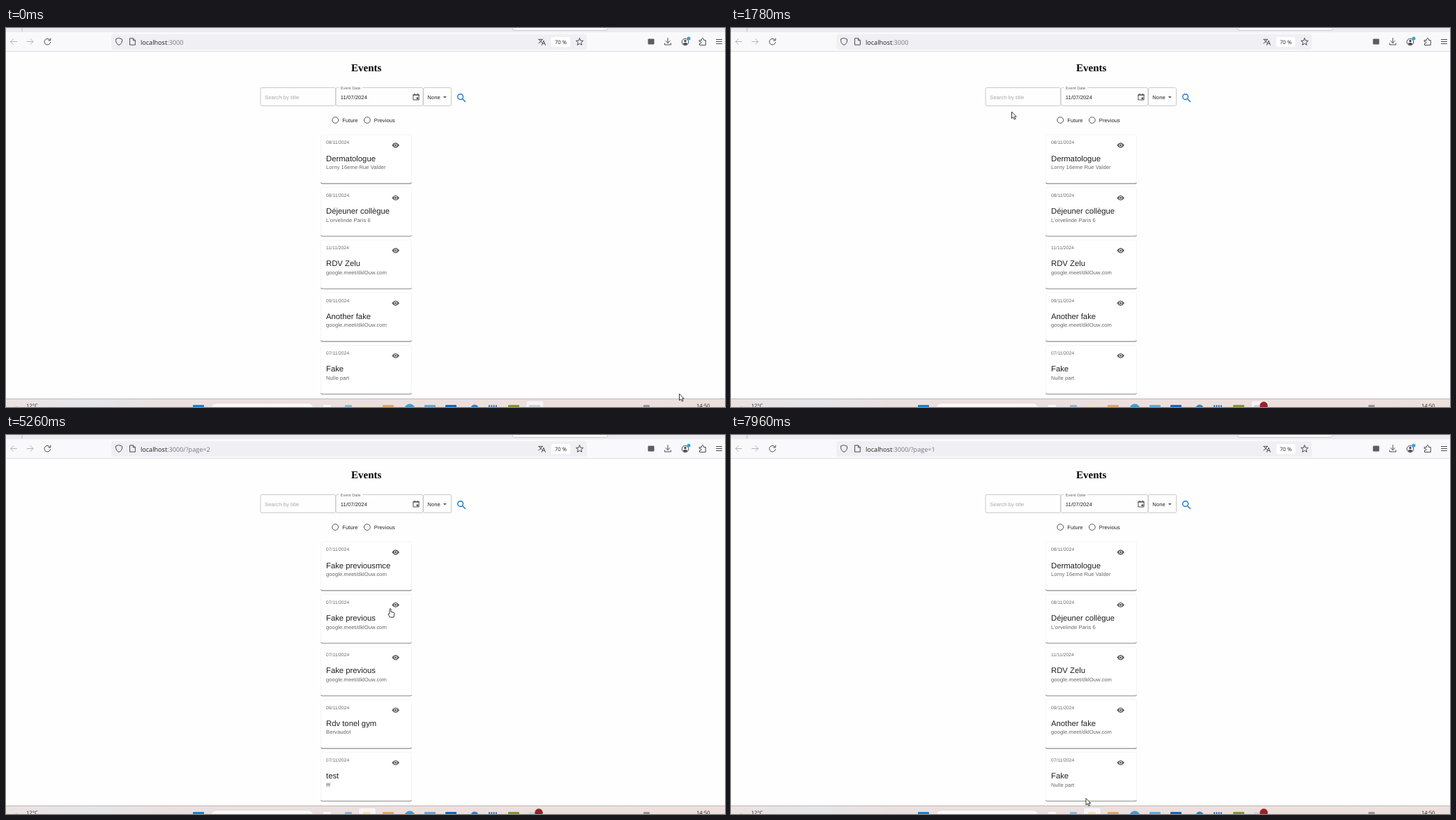
These frames come from a looping animation (1031 px wide and 543 px high, 8 s). An HTML page:

```html
<!DOCTYPE html>
<html lang="en">
<head>
<meta charset="utf-8">
<title>Events</title>
<style>
  html, body { margin: 0; width: 100%; height: 100%; overflow: hidden; background: #fff; }
  svg { display: block; width: 100vw; height: 100vh; }
  text { font-family: "Liberation Sans", Arial, sans-serif; font-size: 7.6px; letter-spacing: .08px; fill: #212121; text-rendering: geometricPrecision; }
  .ui { font-family: "Open Sans", "Noto Sans", sans-serif; letter-spacing: 0; }
  .url { font-size: 9.1px; }
  .rest { fill: #77777f; }
  .serif { font-family: "Liberation Serif", "Times New Roman", serif; letter-spacing: 0; fill: #000; }
  .heading { font-size: 15px; font-weight: bold; }
  .middle { text-anchor: middle; }
  .muted { fill: #666; }
  .hint { fill: #a3a8a8; }
  .label { font-size: 5.65px; fill: #666; }
  .date { font-size: 6.6px; fill: #666; }
  .title { font-size: 11.3px; letter-spacing: 0; }
  .create { font-size: 6.55px; fill: #1976d2; }
  .icon { fill: none; stroke: #4a4a54; stroke-linecap: round; stroke-linejoin: round; }
  .icon.off { stroke: #b4b4ba; }
  .icon.blue { stroke: #1976d2; stroke-width: 1.4; }
  .icon.black { stroke: #000; stroke-width: 1.25; stroke-linecap: butt; }
  .box { fill: none; stroke: #c4c4c4; stroke-width: .9; }
  .box.hover { stroke: #212121; }
  .button { stroke: #8cbae8; stroke-width: .9; }
  .card { stroke: #f3f3f3; stroke-width: .8; }
  .edge { fill: none; stroke: #8f8f8f; stroke-width: 1.1; }
  .ring { stroke: #555; }
  .faint { stroke: #d8d0d0; stroke-width: .6; }
</style>
</head>
<body>
<svg id="stage" viewBox="0 0 1031 543" preserveAspectRatio="none"></svg>
<script>
const LOOP = 8000;
const PAGE_TWO = 4650, PAGE_ONE = 7820;
const CARD_PITCH = 75.4, PAGER_Y = 572, MAX_SCROLL = 52;
const meet = 'google.meet/dklOuw.com';

const lists = [
  [
    ['08', 'Dermatologue', 'Lorny 16eme Rue Valder'],
    ['08', 'Déjeuner collègue', "L'orvelinde Paris 6"],
    ['11', 'RDV Zelu', meet],
    ['09', 'Another fake', meet],
    ['07', 'Fake', 'Nulle part']
  ],
  [
    ['07', 'Fake previousmce', meet],
    ['07', 'Fake previous', meet],
    ['07', 'Fake previous', meet],
    ['06', 'Rdv tonel gym', 'Bervaudot'],
    ['07', 'test', 'fff']
  ]
];

// Cursor moves: start, end, number of steps, then [step, x, y] keys.
const home = [965.5, 524];
const moves = [
  [70, 560, 8, [5, 560, 255], [6, 533, 245], [8, 592.5, 367]],
  [1573, 2050, 8, [4, 402.5, 120], [8, 388, 96]],
  [2180, 2390, 4, [4, 413, 105]],
  [2590, 2810, 4, [4, 621, 259]],
  [3010, 3080, 2, [2, 609, 254]],
  [3556, 4040, 8, [2, 571, 477.5], [8, 520, 518]],
  [4110, 4110, 1, [1, 518, 517]],
  [4720, 5260, 9, [7, 545, 270], [9, 551, 248.5]],
  [5710, 5860, 3, [3, 620.5, 250]],
  [6480, 7160, 11, [7, 492.5, 515], [11, 511, 520]],
  [7420, 7490, 2, [2, 509, 520.5]]
];

// Wheel turns take four steps; a new page jumps to the top.
const wheelDown = [750, 3280, 6060], wheelUp = [1300], jumps = [PAGE_TWO, PAGE_ONE];
const WHEEL_TIME = 220, WHEEL_STEPS = 4;

const text = (x, y, s, cls = '') => `<text x="${x}" y="${y}" class="${cls}">${s}</text>`;
const rect = (x, y, w, h, fill, rx = 0, extra = '') =>
  `<rect x="${x}" y="${y}" width="${w}" height="${h}" rx="${rx}" fill="${fill}" ${extra}/>`;
const box = (x, w, id) => rect(x, 85.5, w, 26, 'none', 2, `class="box" id="${id}"`);
const circle = (x, y, r, fill, extra = '') => `<circle cx="${x}" cy="${y}" r="${r}" fill="${fill}" ${extra}/>`;
const icon = (x, y, d, cls = '') => `<path class="icon ${cls}" transform="translate(${x} ${y})" d="${d}"/>`;
const eyeY = i => 168 + i * CARD_PITCH;

const star = 'M' + Array.from({ length: 10 }, (_, i) => {
  const r = i % 2 ? 2.4 : 5.4, a = i * Math.PI / 5;
  return `${r * Math.sin(a)} ${-r * Math.cos(a)}`;
}).join('L') + 'Z';

function toolbarIcons() {
  return icon(11, 19.5, 'M4.5 0h-9m4-4l-4 4l4 4', 'off') +
    icon(34.5, 19.5, 'M-4.5 0h9m-4-4l4 4l-4 4', 'off') +
    icon(59.5, 19.5, 'M3.8-2A4.4 4.4 0 1 0 4.3 1M4.4-4.6v3h-3') +
    icon(162, 19.5, 'M0-5l4.5 1.7Q5 3 0 5Q-5 3-4.5-3.3Z') +
    icon(181.5, 19.5, 'M-3.6-4.7h4.4l3 3v6.4h-7.4ZM.8-4.5v2.8h3') +
    icon(768.5, 19.5, 'M-5-3.2h6M.3-3.2Q-1 1-4.8 2.4M-3.8-3Q-2.6 0-.3 1.4M-.2 5l2.6-6.4L5 5M.8 2.8h3.2') +
    icon(822.5, 20, star) +
    icon(949, 19.5, 'M0-5v7m-3-3l3 3l3-3M-4.5 2.5v2h9v-2') +
    icon(999, 20, 'M-4.5-2.5h3q0-3 1.5-3t1.5 3h2.8v7h-8.8v-2.5q3 0 3-1.3t-3-1.3Z') +
    icon(1022.5, 19.5, 'M-4-3h8m-8 3h8m-8 3h8');
}

function browser() {
  return rect(0, 0, 1031, 6, '#ececf0') + rect(22.5, 0, 1, 5, '#bbbbc0') +
    rect(726, -6, 137, 9.3, '#fff', 3, 'stroke="#c6c6cb"') +
    rect(0, 6, 1031, 28, '#f9f9fb') + rect(0, 33, 1031, 1, '#dededf') +
    rect(151, 9, 682, 22, '#f0f0f4', 3) +
    text(193, 23.6, 'localhost<tspan class="rest">:3000<tspan id="query"></tspan></tspan>', 'ui url') +
    rect(782, 13, 27, 14, '#fff', 2) + text(795.5, 23, '70 %', 'ui middle') +
    rect(920.5, 15.5, 9, 8, '#5b5b66', 1) + toolbarIcons() +
    circle(974, 20, 4.8, 'none', 'stroke="#4a4a54"') + circle(974, 18.5, 1.7, '#4a4a54') +
    '<ellipse cx="974" cy="22.5" rx="3" ry="1.5" fill="#4a4a54"/>' + circle(979, 15, 2.5, '#2aa5e0');
}

function taskbar() {
  const tile = (x, color, w = 16) => rect(x, 540, w, 8, color, 1);
  return '<defs><linearGradient id="bar"><stop stop-color="#ece2e1"/><stop offset=".12" stop-color="#e5e6e8"/>' +
    '<stop offset=".22" stop-color="#ebe0e0"/><stop offset="1" stop-color="#ede0dc"/></linearGradient></defs>' +
    rect(0, 531, 1031, 12, 'url(#bar)') + rect(0, 530.8, 1031, 1, '#bcb6b7') +
    text(29, 543.7, '12°C', 'ui') + text(990, 543.7, '14:50', 'ui') + circle(15, 545, 3, '#d9c28a') +
    tile(268, '#1684cf') + rect(294, 537.5, 147, 18, '#fbf8f8', 8, 'class="faint"') +
    rect(746, 534, 25, 14, '#f8f4f5', 3, 'id="active" class="faint"') +
    tile(455, '#fafafa', 11) + tile(486, '#8bb9dd', 10) + tile(512, '#f7e3bb', 11) +
    tile(540, '#e3a56a') + tile(600, '#67a9d4') + tile(630, '#1867c0') +
    tile(720, '#83943a') + tile(750, '#d3d3d6') +
    [0, 1, 2, 3].map(i => tile(692 + i * 3.3, '#2d78c4', 2)).join('') +
    circle(579, 546, 7.5, '#3aa0d8') + circle(672, 545, 5.5, '#2f86c8') +
    tile(914, '#99949b', 9) + circle(764, 541, 5.7, '#9b2226', 'id="badge"');
}

function card([day, title, place], i) {
  return `<g transform="translate(0 ${i * CARD_PITCH})">` +
    rect(451.5, 153, 130, 70, '#fff', 2, 'class="card"') +
    '<path class="edge" d="M451.6 221.4q.2 1.5 1.8 1.5h126.2q1.6 0 1.8-1.5"/>' +
    text(459, 166.4, day + '/11/2024', 'date') + text(459, 190.5, title, 'title') + text(459, 202.2, place, 'muted') +
    '<path d="M553.3 168q5.4-7.4 10.8 0q-5.4 7.4-10.8 0" fill="#555"/>' +
    circle(558.7, 168, 2.35, '#fff') + circle(558.7, 168, 1.4, '#555') + '</g>';
}

function filters() {
  const radio = (x, label) => circle(x, 132, 4.4, 'none', 'class="ring"') + text(x + 10, 134.8, label);
  return box(365, 107.5, 'search') + box(473, 125, 'date') + box(598.5, 40, 'kind') +
    rect(477, 84, 34, 3, '#fefefe') + text(479.7, 88, 'Event Date', 'label') +
    text(371, 101.7, 'Search by title', 'hint') +
    text(479.7, 101.7, '11/07/2024') + text(604.3, 101.7, 'None') +
    '<path d="M626.8 98h5l-2.5 2.6Z" fill="#555"/>' +
    icon(588.2, 98.8, 'M-3.9-3.5h7.8v7.7h-7.8Zm0 .9h7.8M-2.2-4.6v1m4.4-1v1') +
    rect(588.6, 99.4, 2.6, 2.6, '#555') +
    circle(651.6, 98.6, 3.9, 'none', 'class="icon blue"') + icon(654.5, 101.5, 'M0 0l4 4', 'blue') +
    radio(472.2, 'Future') + radio(517.8, 'Previous');
}

function page() {
  const next = x => icon(x, PAGER_Y, 'M-3.9 0h7.4M.1-3.6l3.6 3.6l-3.6 3.6', 'black');
  const previous = x => icon(x, PAGER_Y, 'M3.9 0h-7.4M-.1-3.6l-3.6 3.6l3.6 3.6', 'black');
  const pagers = [
    text(508.6, 578, '1', 'serif') + next(518.3),
    previous(509) + text(514.6, 578, '2', 'serif') + next(523.6)
  ];
  return text(516.7, 62.3, 'Events', 'serif heading middle') + filters() +
    lists.map((list, n) => `<g id="list${n}">${list.map(card).join('')}${pagers[n]}</g>`).join('') +
    rect(481.4, 534.4, 70.4, 21.6, '#fff', 2, 'class="button"') +
    circle(502.5, 545, 6.1, 'none', 'class="icon blue"') + icon(502.5, 545, 'M-3.3 0h6.6M0-3.3v6.6', 'blue') +
    text(512, 547.3, 'CREATE', 'create');
}

const shapes = {
  pointer: 'M0 0v9.6l2.2-2l1.6 3.4l1.6-.7L3.9 7h2.9Z',
  hand: 'M-1 7.8V1q1-1.6 2 0v3.8l4 1q1 .3 1 1.6l-1 5.2h-5.5l-2.5-4q.5-1.6 2-.8Z',
  beam: 'M-2-5h4m-2 0v10m-2 0h4'
};

const stage = document.getElementById('stage');
stage.innerHTML = '<defs><clipPath id="view"><rect y="34" width="1031" height="497"/></clipPath></defs>' +
  rect(0, 0, 1031, 543, '#fefefe') + `<g clip-path="url(#view)"><g id="page">${page()}</g></g>` +
  browser() + taskbar() + '<path id="cursor" fill="#fff" stroke="#222" stroke-width=".9" stroke-linejoin="round"/>';

const el = {};
for (const id of ['page', 'query', 'active', 'badge', 'search', 'date', 'list0', 'list1', 'cursor'])
  el[id] = document.getElementById(id);
const show = (node, on) => node.setAttribute('visibility', on ? 'visible' : 'hidden');

// The first step shows at the start of a burst, the last one at its end.
const stepAt = (t, start, end, steps) =>
  start === end ? steps : Math.min(steps, 1 + Math.floor((t - start + 4) / (end - start) * (steps - 1)));

function cursorAt(t) {
  let pos = home;
  for (const [start, end, steps, ...keys] of moves) {
    if (t < start) break;
    const step = stepAt(t, start, end, steps);
    const i = keys.findIndex(key => key[0] >= step);
    const from = i ? keys[i - 1] : [0, ...pos], to = keys[i];
    const part = (step - from[0]) / (to[0] - from[0]);
    pos = [1, 2].map(c => from[c] + (to[c] - from[c]) * part);
  }
  return pos;
}

function scrollAt(t) {
  const start = Math.max(0, ...[...wheelDown, ...wheelUp, ...jumps].filter(s => s <= t));
  if (!start || jumps.includes(start)) return 0;
  const part = stepAt(t, start, start + WHEEL_TIME, WHEEL_STEPS) / WHEEL_STEPS;
  const eased = Math.sin(part * Math.PI / 2) ** 1.79;
  return MAX_SCROLL * (wheelUp.includes(start) ? 1 - eased : eased);
}

function draw(t) {
  const [x, y] = cursorAt(t), scroll = scrollAt(t);
  const top = y + scroll;
  const second = t >= PAGE_TWO && t < PAGE_ONE;
  const inField = top > 85 && top < 112;
  const overSearch = inField && x > 365 && x < 472;
  const overDate = inField && x > 473 && x < 598;
  const overPager = Math.abs(top - PAGER_Y) < 6 && x > (second ? 505 : 514) && x < 528;
  const overEye = lists[0].some((_, i) => Math.hypot(x - 558.7, top - eyeY(i)) < 12);
  const shape = overSearch || overDate ? 'beam' : overPager || overEye ? 'hand' : 'pointer';

  el.page.setAttribute('transform', `translate(0 ${-scroll})`);
  el.cursor.setAttribute('transform', `translate(${x} ${y})`);
  el.cursor.setAttribute('d', shapes[shape]);
  el.search.classList.toggle('hover', overSearch);
  el.date.classList.toggle('hover', overDate);
  show(el.list0, !second);
  show(el.list1, second);
  show(el.badge, t >= 70);
  el.active.setAttribute('x', t < PAGE_TWO ? 746 : 505.5);
  el.query.textContent = t < PAGE_TWO ? '' : second ? '/?page=2' : '/?page=1';
}

const began = performance.now();
function tick() {
  draw((performance.now() - began) % LOOP);
  requestAnimationFrame(tick);
}
tick();
</script>
</body>
</html>
```
